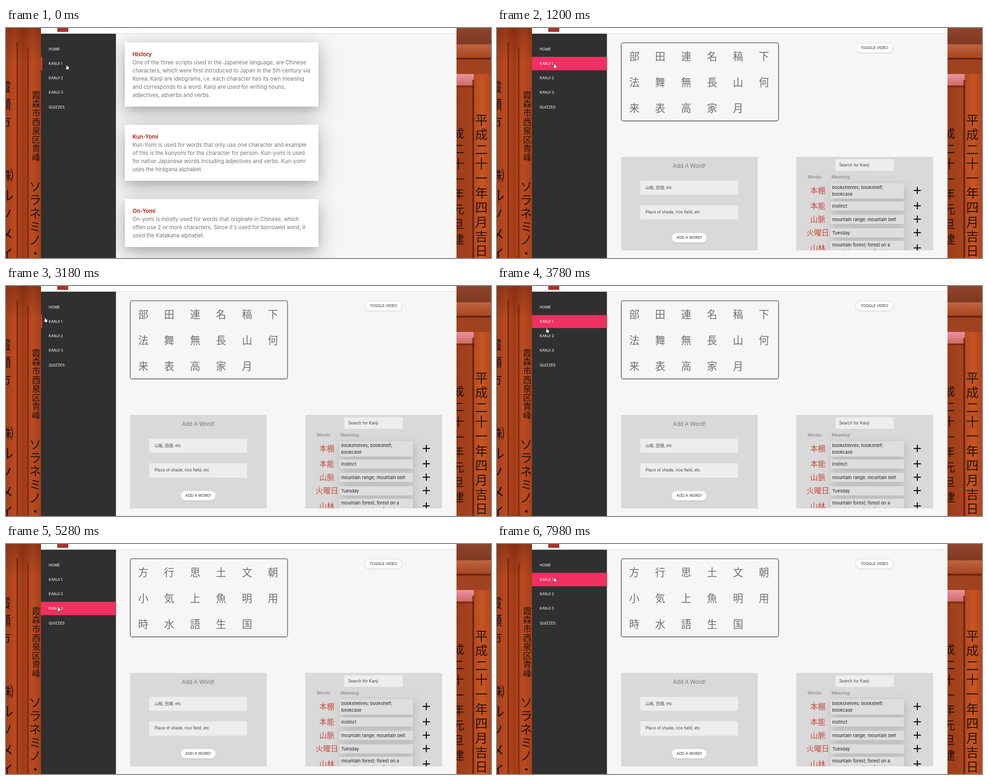
These frames come from a looping animation (1012 by 480 pixels, 8000 ms). An HTML page with a canvas:

```html
<!DOCTYPE html>
<html lang="en">
<head>
<meta charset="utf-8">
<title>Kanji study</title>
<style>
html, body { margin: 0; width: 100%; height: 100%; overflow: hidden; background: #fff; }
canvas { display: block; width: 1012px; height: 480px; }
</style>
</head>
<body>
<canvas id="stage" width="1012" height="480"></canvas>
<script>
const ctx = document.getElementById('stage').getContext('2d');
const LOOP = 8000;
const FONT = 'Inter, "Noto Sans CJK JP", "Noto Sans CJK", sans-serif';
const CJK = '"Noto Sans CJK JP", "Noto Sans CJK", sans-serif';

const menu = ['HOME', 'KANJI 1', 'KANJI 2', 'KANJI 3', 'QUIZZES'];
const rowY = i => 44 + i * 30.2;

const cards = [
  { y: 30, h: 134, title: 'History', lines: [
    'One of the three scripts used in the Japanese language, are Chinese',
    'characters, which were first introduced to Japan in the 5th century via',
    'Korea. Kanji are ideograms, i.e. each character has its own meaning',
    'and corresponds to a word. Kanji are used for writing nouns,',
    'adjectives, adverbs and verbs.'] },
  { y: 202, h: 117, title: 'Kun-Yomi', lines: [
    'Kun-Yomi is used for words that only use one character and example',
    'of this is the kunyomi for the character for person. Kun-yomi is used',
    'for native Japanese words including adjectives and verbs. Kun-yomi',
    'uses the hiragana alphabet.'] },
  { y: 357, h: 100, title: 'On-Yomi', lines: [
    'On-yomi is mostly used for words that originate in Chinese, which',
    "often use 2 or more characters. Since it's used for borrowed word, it",
    'used the Katakana alphabet.'] }
];

const sets = ['部田連名稿下法舞無長山何来表高家月',
              '女場人子大分社日見出言火話事本年学',
              '方行思土文朝小気上魚明用時水語生国'];

const words = [
  { kanji: '本棚', y: 339, top: 324, h: 32, lines: ['bookshelves; bookshelf;', 'bookcase'] },
  { kanji: '本能', y: 371, top: 362, h: 19, lines: ['instinct'] },
  { kanji: '山脈', y: 399, top: 390, h: 19, lines: ['mountain range; mountain belt'] },
  { kanji: '火曜日', y: 427, top: 418, h: 19, lines: ['Tuesday'] },
  { kanji: '山林', y: 459, top: 444, h: 32, lines: ['mountain forest; forest on a', 'mountain; montane forest'] }
];

// Page shown from each time on: -1 is home, otherwise an index into sets.
const pages = [[0, -1], [240, 0], [4180, 1], [5020, 2]];
const ICONS_AT = 600;

// Menu row, pointer enters, pointer leaves.
const hovers = [[1, -250, 1800], [2, 2640, 2935], [1, 2935, 3770], [2, 3770, 4586],
                [3, 4586, 5780], [2, 5780, 5930], [1, 5930, 9000]];

const path = [[0, 128, 82], [300, 121, 79], [1300, 121, 79], [2040, 262, 118], [2400, 262, 118],
              [3180, 83, 71], [3500, 98, 74], [4000, 110, 106], [4500, 108, 106], [4620, 105, 127],
              [4900, 108, 135], [5600, 112, 136], [6180, 124, 65], [6600, 121, 74], [8000, 121, 74]];

const clamp = v => Math.max(0, Math.min(1, v));

function bezier(x1, y1, x2, y2) {
  const at = (a, b, s) => 3 * (1 - s) * (1 - s) * s * a + 3 * (1 - s) * s * s * b + s * s * s;
  return v => {
    const x = clamp(v);
    let lo = 0, hi = 1;
    for (let i = 0; i < 24; i++) {
      const mid = (lo + hi) / 2;
      if (at(x1, x2, mid) < x) lo = mid; else hi = mid;
    }
    return at(y1, y2, (lo + hi) / 2);
  };
}
const ease = bezier(.25, .1, .25, 1);
const snap = bezier(1, 0, 0, 1);

function rect(x, y, w, h, fill) {
  ctx.fillStyle = fill;
  ctx.fillRect(x, y, w, h);
}

function pill(x, y, w, h, r, fill, stroke, width = 1) {
  ctx.beginPath();
  ctx.roundRect(x, y, w, h, r);
  if (fill) { ctx.fillStyle = fill; ctx.fill(); }
  if (stroke) { ctx.strokeStyle = stroke; ctx.lineWidth = width; ctx.stroke(); }
}

function text(str, x, y, size, color, align = 'left', weight = 400, family = FONT) {
  ctx.font = `${weight} ${size}px ${family}`;
  ctx.textAlign = align;
  ctx.textBaseline = 'alphabetic';
  ctx.fillStyle = color;
  ctx.fillText(str, x, y + size * (family === CJK ? .38 : .36));
}

function shadowed(blur, dx, dy, color, draw) {
  ctx.save();
  ctx.shadowColor = color;
  ctx.shadowBlur = blur;
  ctx.shadowOffsetX = dx;
  ctx.shadowOffsetY = dy;
  draw();
  ctx.restore();
}

function gradient(x0, y0, x1, y1, ...colors) {
  const g = ctx.createLinearGradient(x0, y0, x1, y1);
  colors.forEach((c, i) => g.addColorStop(i / (colors.length - 1), c));
  return g;
}

function column(str, x, y, step, size) {
  [...str].forEach((ch, i) => text(ch, x, y + i * step, size, '#24110b', 'center', 500, CJK));
}

function backdrop() {
  // left posts
  rect(0, 0, 73, 480, gradient(0, 0, 73, 0, '#a8401a', '#b84a20', '#a03a16', '#bb4c20', '#a5401b'));
  rect(0, 0, 73, 70, gradient(0, 0, 0, 70, 'rgba(80,25,10,.35)', 'rgba(80,25,10,0)'));
  rect(22, 30, 3, 450, 'rgba(70,20,8,.5)');
  rect(44, 40, 3, 440, 'rgba(70,20,8,.45)');
  column('霞瀬市', -3, 123, 37, 27);
  column('霞森市西泉区青峰', 63, 140, 18.6, 18);
  column('㈱ルノメイ', 1, 308, 41, 29);
  column('ソラネミノ・', 61, 330, 28, 25);

  // right beams and posts
  rect(940, 0, 36, 480, gradient(940, 0, 976, 0, '#9c3d1a', '#a9441d'));
  rect(976, 0, 36, 480, gradient(976, 0, 1012, 0, '#b64a20', '#c65524', '#b0461e'));
  rect(940, 0, 72, 34, gradient(0, 0, 0, 34, '#8f452c', '#803820'));
  rect(940, 34, 72, 29, gradient(0, 34, 0, 63, '#bd653f', '#a6451f'));
  rect(940, 62, 72, 4, '#6b2510');
  rect(940, 66, 72, 30, '#9f4220');
  rect(940, 96, 36, 24, gradient(0, 96, 0, 120, '#e894a2', '#cf6a60'));
  rect(940, 120, 36, 4, '#7c2f16');
  rect(973, 108, 4, 372, 'rgba(65,20,8,.6)');
  column('成二十一年元旦建', 944, 220, 31.5, 24);
  column('平成二十一年四月吉日', 992, 192, 30.4, 26);
}

function frame() {
  rect(73, 0, 867, 480, '#f6f6f6');
  rect(73, 0, 867, 11, '#fff');
  rect(73, 11, 867, 1, '#dcdcdc');
  rect(107, -15, 23, 23, '#a8332c');
}

function sidebar(t) {
  rect(73, 12, 156.4, 468, '#303030');
  for (const [row, enter, leave] of hovers) {
    if (t < enter) continue;
    const age = Math.min(t, leave) - enter;
    const grow = snap((age - 200) / 400);
    const tall = ease(age / 200) * (1 - ease((t - leave) / 200));
    if (tall < .01) continue;
    rect(73, rowY(row) - 14 * tall, 1.6 + 154.8 * grow, 28 * tall, grow < .03 ? '#c8452a' : '#f03060');
  }
  menu.forEach((name, i) => text(name, 89, rowY(i), 7.8, '#fff'));
}

function home() {
  for (const c of cards) {
    const box = () => rect(248, c.y, 404, c.h, '#fff');
    shadowed(40, 0, 11, 'rgba(0,0,0,.28)', box);
    shadowed(12, 0, 7, 'rgba(0,0,0,.08)', box);
  }
  for (const c of cards) {
    rect(248, c.y, 404, c.h, '#fff');
    text(c.title, 264, c.y + 24.5, 11.5, '#a31f10', 'left', 600);
    c.lines.forEach((line, i) => text(line, 264, c.y + 41.7 + i * 17, 11.2, '#757575'));
  }
}

function button(label, x, y, w, h) {
  shadowed(2, 0, 1, 'rgba(0,0,0,.08)', () => pill(x, y, w, h, h / 2, '#fff', '#e0e0e0'));
  text(label, x + w / 2, y + h / 2, 7.8, '#2a2a2a', 'center');
}

function plus(x, y) {
  rect(x - 7.5, y - 1.1, 15, 2.2, '#111');
  rect(x - 1.1, y - 7.5, 2.2, 15, '#111');
}

function lesson(set, icons) {
  pill(259.3, 30.8, 328.2, 163.1, 4, null, '#6a6a6a', 1.6);
  [...sets[set]].forEach((ch, i) =>
    text(ch, 286.5 + i % 6 * 54.1, 59 + Math.floor(i / 6) * 54, 21.5, '#707070', 'center', 400, CJK));
  button('TOGGLE VIDEO', 748.5, 31, 78, 20.5);

  rect(259, 269, 285, 195, '#d9d9d9');
  text('Add A Word!', 401, 288, 11.4, '#777', 'center');
  rect(299, 319, 204, 29, '#ededed');
  rect(299, 370, 204, 30, '#ededed');
  text('山陰, 田畑, etc', 310, 333, 8.4, '#444');
  text('Place of shade, rice field, etc', 310, 384.5, 8.3, '#444');
  button('ADD A WORD!', 364.5, 427.5, 73, 20);

  ctx.save();
  ctx.beginPath();
  ctx.rect(624.5, 269, 285.5, 195);
  ctx.clip();
  rect(624, 269, 286, 195, '#d9d9d9');
  rect(706, 274, 122, 24, '#ededed');
  text('Search for Kanji', 714, 286, 8.4, '#444');
  text('Words:', 648, 310.5, 9.1, '#777');
  text('Meaning:', 698, 310.5, 9.1, '#777');
  for (const w of words) {
    shadowed(18, 3, 6, 'rgba(0,0,0,.16)', () => rect(696, w.top, 153, w.h, '#dedede'));
  }
  for (const w of words) {
    rect(696, w.top, 153, w.h, '#dedede');
    text(w.kanji, 669.5, w.y, 15.7, '#c9493c', 'center', 400, CJK);
    w.lines.forEach((line, i) => text(line, 699.5, w.top + (w.h > 20 ? 8.5 : 9.5) + i * 13.8, 9.25, '#222'));
    if (icons) plus(877, w.y);
  }
  ctx.restore();
}

function pointer(t) {
  let i = 1;
  while (i < path.length - 1 && path[i][0] < t) i++;
  const [t0, x0, y0] = path[i - 1], [t1, x1, y1] = path[i];
  const u = clamp((t - t0) / (t1 - t0)), k = u * u * (3 - 2 * u);
  ctx.save();
  ctx.translate(x0 + (x1 - x0) * k, y0 + (y1 - y0) * k);
  ctx.beginPath();
  ctx.moveTo(-2.2, -4);
  ctx.lineTo(-.8, -4.2);
  ctx.lineTo(-.2, -1.4);
  ctx.lineTo(3, -.8);
  ctx.lineTo(3.2, 2);
  ctx.lineTo(2, 4.5);
  ctx.lineTo(-1.2, 4.5);
  ctx.lineTo(-3.6, 1);
  ctx.lineTo(-1.5, .8);
  ctx.closePath();
  ctx.lineJoin = 'round';
  ctx.lineWidth = 1.4;
  ctx.strokeStyle = '#222';
  ctx.stroke();
  ctx.fillStyle = '#fff';
  ctx.fill();
  ctx.restore();
}

function draw(t) {
  backdrop();
  frame();
  const page = pages.filter(p => p[0] <= t).pop()[1];
  if (page < 0) home(); else lesson(page, t >= ICONS_AT);
  sidebar(t);
  pointer(t);
}

const start = performance.now();
function tick() {
  draw((performance.now() - start) % LOOP);
  requestAnimationFrame(tick);
}
tick();
</script>
</body>
</html>
```
